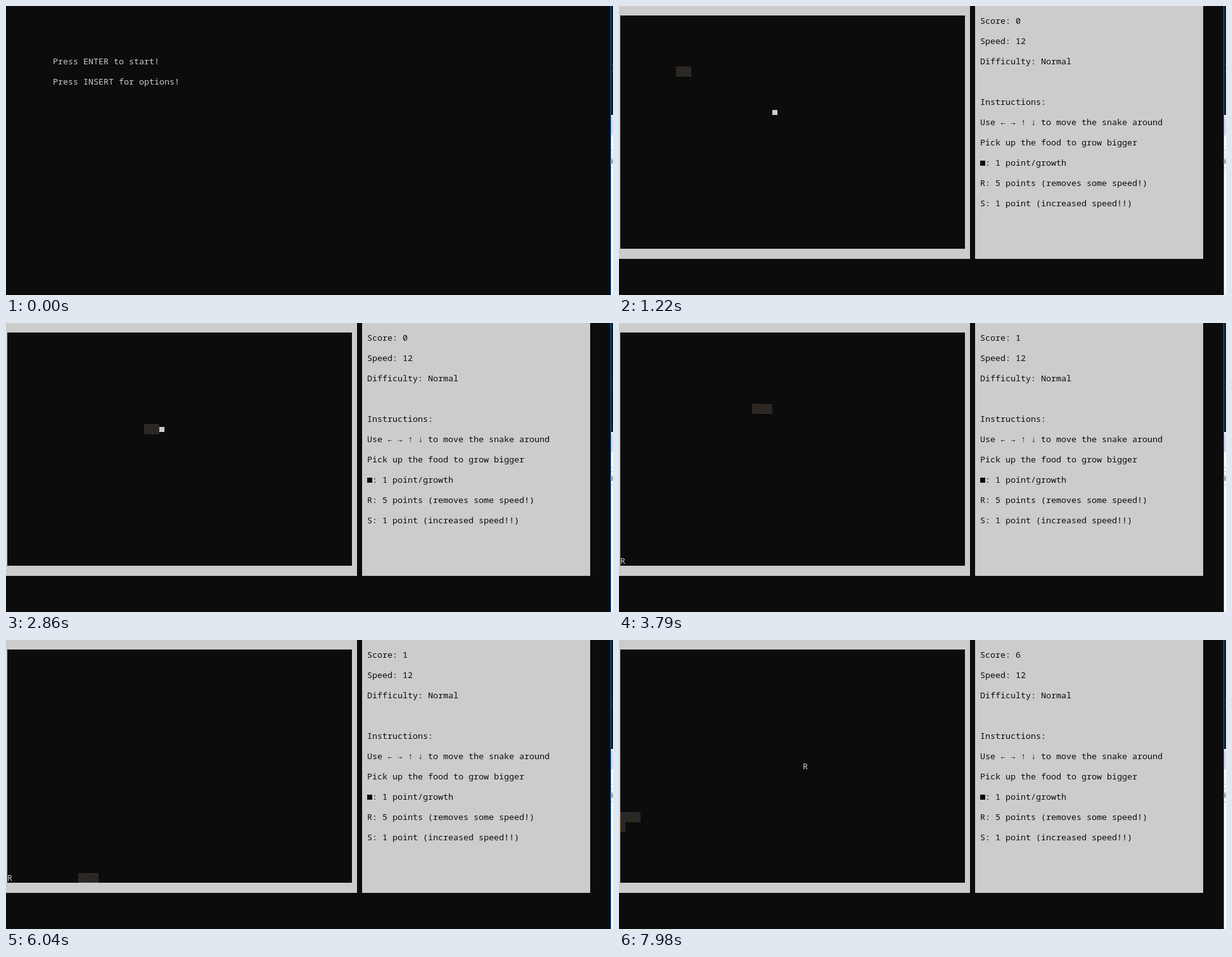
An HTML page with a canvas for the animation above (8 s loop, 958 px wide and 456 px high).

```html
<!DOCTYPE html>
<html lang="en">
<head>
<meta charset="utf-8">
<title>Console snake</title>
<style>
  html, body { margin: 0; width: 100%; height: 100%; overflow: hidden; background: #0c0c0c; }
  canvas { display: block; }
</style>
</head>
<body>
<canvas id="stage" width="958" height="456"></canvas>
<script>
const ctx = document.getElementById('stage').getContext('2d', { alpha: false });
const DARK = '#0c0c0c', LIGHT = '#cccccc';
const LOOP = 8000, START = 370, TICK = 77.65, LEAD = 9;

// Runs of moves, one per tick; "." is a tick without a move.
const ROUTE = 'R8 .1 R3 D3 R7 D1 .1 R11 U1 .1 U1 L6 D7 .1 D8 L6 .1 L15 .1 L5 U6 R2 .1 R1'
  .split(' ').map(run => run[0].repeat(+run.slice(1))).join('');
const STEP = { R: [1, 0], L: [-1, 0], U: [0, -1], D: [0, 1] };
const FOOD = [
  { col: 30, row: 9, sign: '■', points: 1 },
  { col: 0, row: 22, sign: 'R', points: 5 },
  { col: 36, row: 11, sign: 'R', points: 5 }
];
const HELP = ['Instructions:', 'Use ← → ↑ ↓ to move the snake around',
  'Pick up the food to grow bigger', '■: 1 point/growth',
  'R: 5 points (removes some speed!)', 'S: 1 point (increased speed!!)'];

const cellX = col => 2 + 8 * col;
const cellY = row => 15 + 16 * row;

function box(color, x, y, w, h) {
  ctx.fillStyle = color;
  ctx.fillRect(x, y, w, h);
}

function print(str, col, row, color) {
  if (str[0] === '■') {
    box(color, cellX(col), cellY(row) + 5, 8, 8);
    str = str.slice(1);
    col++;
  }
  ctx.fillStyle = color;
  ctx.fillText(str, cellX(col), cellY(row) + 13);
}

// One shaded character: staggered dots with warm and cool edges.
function shade([col, row]) {
  const tints = ['#a5734a', '#8c8c84', '#9a7350', '#5a7890'];
  for (let y = 0; y < 8; y++)
    for (let x = 0; x < 4; x++)
      box(tints[(x + y) % 4], cellX(col) + 2 * x + y % 2, cellY(row) + 1 + 2 * y, 1, 1);
}

function play(ticks) {
  const body = [[1, 5], [2, 5], [3, 5]];
  let eaten = 0, score = 0;
  for (const move of ROUTE.slice(0, ticks)) {
    if (move === '.') continue;
    const [col, row] = body[body.length - 1];
    const head = [col + STEP[move][0], row + STEP[move][1]];
    const food = FOOD[eaten];
    body.push(head);
    if (head[0] === food.col && head[1] === food.row) {
      score += food.points;
      eaten++;
    } else body.shift();
  }
  return { body, score, food: FOOD[eaten] };
}

function drawMenu() {
  print('Press ENTER to start!', 9, 4, LIGHT);
  print('Press INSERT for options!', 9, 6, LIGHT);
}

function drawGame(ticks) {
  const { body, score, food } = play(ticks);
  box(LIGHT, 0, 0, 554, 399);
  box(DARK, 2, 15, 544, 368);
  box(LIGHT, 562, 0, 360, 399);
  [`Score: ${score}`, 'Speed: 12', 'Difficulty: Normal', '', ...HELP]
    .forEach((line, i) => print(line, 71, 2 * i, DARK));
  print(food.sign, food.col, food.row, LIGHT);
  body.forEach(shade);
}

// Sliver of the window behind the console.
function drawEdge() {
  box('#0078d7', 954, 0, 1, 456);
  box('#0b1a2c', 955, 0, 3, 172);
  box('#8a949c', 957, 93, 1, 1);
  box('#8a949c', 957, 103, 1, 1);
  box('#ffffff', 955, 172, 3, 284);
  box('#d6e6f5', 955, 174, 3, 4);
  box('#dcd6f4', 955, 178, 3, 26);
  for (const y of [227, 234, 255]) box('#c4ccd4', 955, y, 3, 1);
  box('#303030', 956, 240, 1, 1);
  box('#303030', 956, 242, 1, 7);
}

function frame() {
  const t = performance.now() % LOOP;
  box(DARK, 0, 0, 958, 456);
  ctx.font = '13.3333px "Noto Sans Mono", "DejaVu Sans Mono", monospace';
  if (t < START) drawMenu();
  else drawGame(Math.floor((t - START + LEAD) / TICK));
  drawEdge();
  requestAnimationFrame(frame);
}
frame();
</script>
</body>
</html>
```
